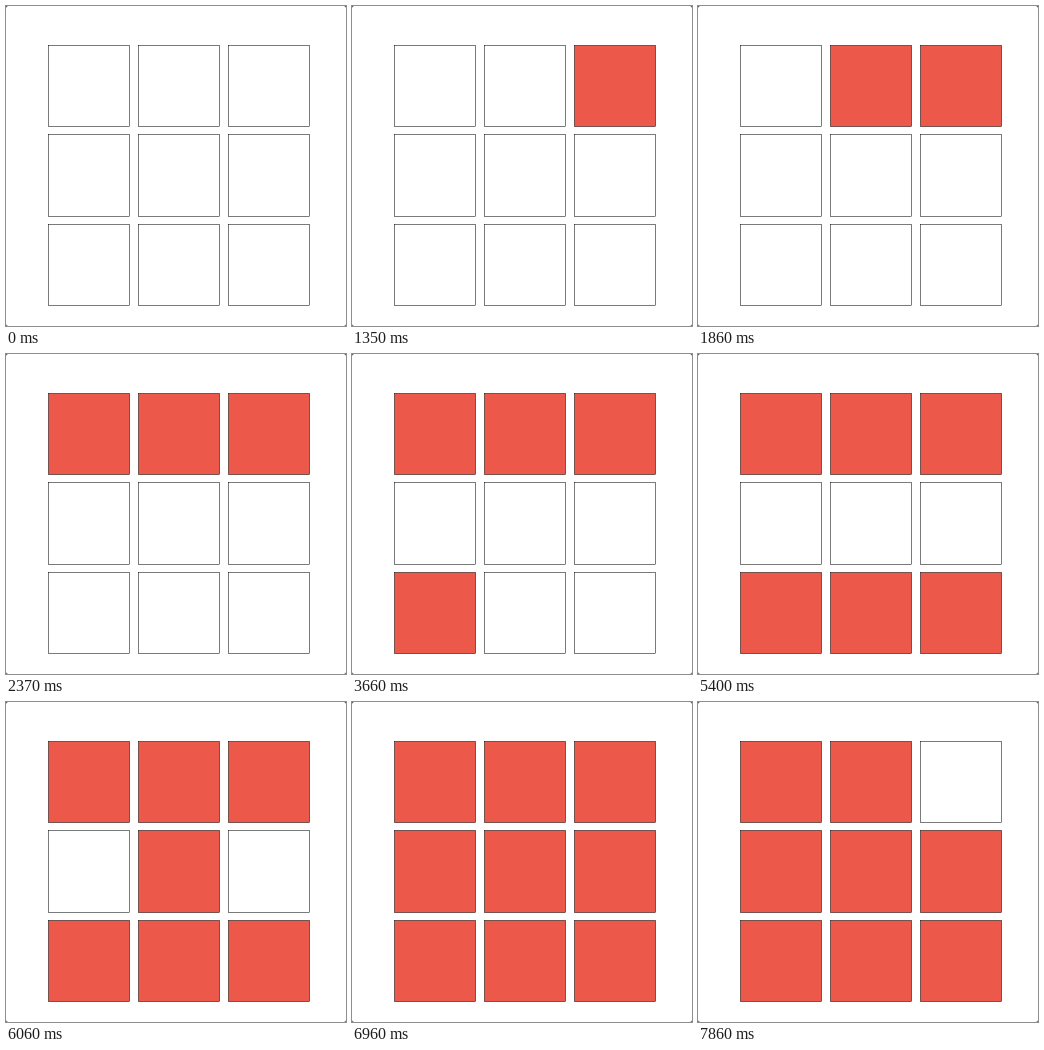
An HTML page for the animation above (8 s loop, 340 by 320 pixels).

```html
<!DOCTYPE html>
<html lang="en">
<head>
<meta charset="utf-8">
<title>Grid of squares</title>
<style>
  html, body { margin: 0; width: 100%; height: 100%; overflow: hidden; background: #444; }
  svg { display: block; }
</style>
</head>
<body>
<svg id="stage" width="340" height="320" viewBox="0 0 340 320">
  <rect width="340" height="320" rx="2.5" fill="#fff"/>
</svg>
<script>
const LOOP = 8000;
const RED = '#ec594b';
const WHITE = '#fff';
const columns = [[42.5, 81], [132.5, 81], [222.5, 81]];
const rows = [[39.5, 81], [128.5, 82], [218.5, 81]];

// Times at which each cell toggles, row by row.
const toggles = [
  [2370], [1860], [1350, 7860],
  [6450], [6060], [6960],
  [3660], [4920], [5400]
];

const stage = document.getElementById('stage');

function addCell(index) {
  const [x, width] = columns[index % 3];
  const [y, height] = rows[Math.floor(index / 3)];
  const cell = document.createElementNS('http://www.w3.org/2000/svg', 'rect');
  const attributes = { x, y, width, height, stroke: '#000', 'stroke-width': 0.52 };
  for (const name in attributes) cell.setAttribute(name, attributes[name]);
  return stage.appendChild(cell);
}

const cells = toggles.map((_, index) => addCell(index));

function render(time) {
  cells.forEach((cell, index) => {
    const count = toggles[index].filter(at => time >= at).length;
    cell.setAttribute('fill', count % 2 ? RED : WHITE);
  });
}

const start = performance.now();
function tick() {
  render((performance.now() - start) % LOOP);
  requestAnimationFrame(tick);
}
render(0);
requestAnimationFrame(tick);
</script>
</body>
</html>
```
